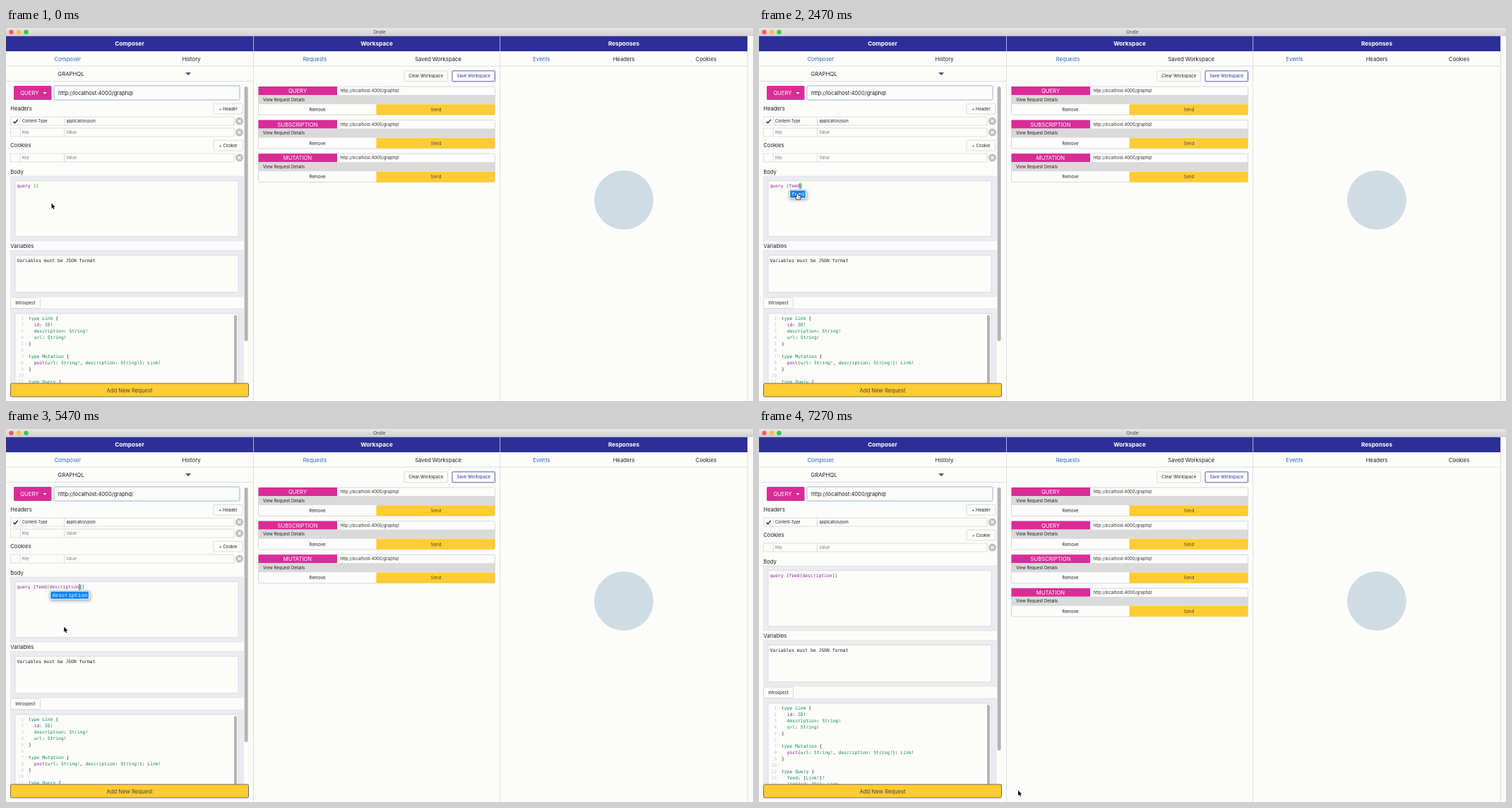
An HTML page with a canvas for the animation above (7.31 s loop, 1058 by 529 pixels).

```html
<!DOCTYPE html>
<html lang="en">
<head>
<meta charset="utf-8">
<title>Ondle</title>
<style>
html, body { margin: 0; width: 100%; height: 100%; overflow: hidden; background: #fcfdfb; }
canvas { display: block; width: 1058px; height: 529px; }
</style>
</head>
<body>
<canvas id="stage"></canvas>
<script>
const W = 1058, H = 529, LOOP = 7310;
const SANS = 'Inter, "Noto Sans", sans-serif';
const MONO = '"DejaVu Sans Mono", monospace';
const HINT = '"Liberation Mono", monospace';
const CH = 3.83;
const C = {
  page: '#fcfdfb', navy: '#2e2e98', pink: '#da2c96', yellow: '#ffcc33', line: '#d6d6d6',
  ink: '#1f1f1f', blue: '#2d64c0', panel: '#ebecf0', purple: '#8a1a9c', green: '#078654',
  match: '#0aa528', hint: '#0a82f5'
};
const URL_TEXT = 'http://localhost:4000/graphql';

const canvas = document.getElementById('stage');
const ctx = canvas.getContext('2d');
const dpr = window.devicePixelRatio || 1;
canvas.width = W * dpr;
canvas.height = H * dpr;

function fill(x, y, w, h, color) {
  ctx.fillStyle = color;
  ctx.fillRect(x, y, w, h);
}

function box(x, y, w, h, bg, border, radius = 0) {
  ctx.beginPath();
  ctx.roundRect(x, y, w, h, radius);
  if (bg) { ctx.fillStyle = bg; ctx.fill(); }
  if (border) { ctx.strokeStyle = border; ctx.lineWidth = 0.8; ctx.stroke(); }
}

function disc(x, y, r, color) {
  ctx.fillStyle = color;
  ctx.beginPath();
  ctx.arc(x, y, r, 0, Math.PI * 2);
  ctx.fill();
}

function shape(points, color, border, width = 1) {
  ctx.beginPath();
  for (let i = 0; i < points.length; i += 2) ctx.lineTo(points[i], points[i + 1]);
  ctx.closePath();
  if (border) { ctx.strokeStyle = border; ctx.lineWidth = width; ctx.stroke(); }
  ctx.fillStyle = color;
  ctx.fill();
}

// y is the middle of the capital letters
function text(s, x, y, size = 7.7, color = C.ink, align = 'left', font = SANS, weight = 400) {
  ctx.font = `${weight} ${size}px ${font}`;
  ctx.textAlign = align;
  ctx.fillStyle = color;
  ctx.fillText(s, x, y + size * 0.36);
}

const mid = (s, x, y, size, color, weight) => text(s, x, y, size, color, 'center', SANS, weight);
const code = (s, x, y, color = C.ink, align) => text(s, x, y, 6.36, color, align, MONO);

function button(s, x, y, w, h, color = C.ink, border = '#d2d2cc') {
  box(x, y, w, h, C.page, border, 1);
  mid(s, x + w / 2, y + h / 2, 6, color);
}

function drawFrame() {
  fill(0, 0, W, H, C.page);
  const bar = ctx.createLinearGradient(0, 0, 0, 11.5);
  bar.addColorStop(0, '#e8e7e8');
  bar.addColorStop(1, '#d1d0d1');
  fill(0, 0, W, 11.5, bar);
  ['#fc5b57', '#fdbc40', '#34c84a'].forEach((c, i) => disc(7.5 + 10.5 * i, 5.7, 3.2, c));
  mid('Ondle', 529, 6, 6.2, '#444');

  fill(0, 11.5, 1050, 21.5, C.navy);
  mid('Composer', 175, 22, 8.2, '#fff', 700);
  mid('Workspace', 525, 22, 8.2, '#fff', 700);
  mid('Responses', 875, 22, 8.2, '#fff', 700);
  fill(0, 53.6, 1050, 0.8, C.line);
  for (const x of [350, 699.3, 1050]) fill(x, 11.5, 0.8, H, C.line);

  const tabs = [['Composer', 87.3, 1], ['History', 262.5], ['Requests', 437.5, 1],
    ['Saved Workspace', 612, 0], ['Events', 758.5, 1], ['Headers', 875], ['Cookies', 991.5]];
  for (const [s, x, on] of tabs) mid(s, x, 43.8, 7.7, on ? C.blue : C.ink);

  mid('GRAPHQL', 92, 65, 7.8);
  shape([254.3, 63, 262, 63, 258.15, 67.3], '#555');
  fill(0, 75, 350, 0.8, C.line);
  disc(875, 244, 42, '#cfdde3');
}

function fieldRow(y, key, value) {
  box(6.5, y, 316.5, 12, C.page, C.line);
  fill(19.8, y, 0.8, 12, C.line);
  fill(82, y, 0.8, 12, C.line);
  const color = key ? C.ink : '#777';
  text(key || 'Key', 23, y + 6, 5.5, color);
  text(value || 'Value', 85.5, y + 6, 5.5, color);
  if (key) {
    ctx.strokeStyle = '#111';
    ctx.lineWidth = 1.3;
    ctx.beginPath();
    ctx.moveTo(10.4, y + 6.6);
    ctx.lineTo(12.6, y + 8.8);
    ctx.lineTo(16.6, y + 3.8);
    ctx.stroke();
  }
  disc(330.5, y + 6, 5.5, '#bfbfbb');
  ctx.strokeStyle = '#fff';
  ctx.lineWidth = 1.1;
  ctx.beginPath();
  for (const d of [2, -2]) {
    ctx.moveTo(330.5 - d, y + 4);
    ctx.lineTo(330.5 + d, y + 8);
  }
  ctx.stroke();
}

function editor(y, h) {
  fill(6.5, y, 329.5, h, C.panel);
  box(6.5, y, 329.5, h, null, '#dfe0e3');
  box(13, y + 6.7, 316, h - 13, C.page, '#d3d5d8');
}

const SCHEMA = ['type Link {', '  id: ID!', '  description: String!', '  url: String!', '}', '',
  'type Mutation {', '  post(url: String!, description: String!): Link!', '}', '',
  'type Query {', '  feed: [Link!]!', '  link(id: ID!): Link'];

function schemaLine(s, x, y) {
  for (const m of s.matchAll(/\w+|[^\w\s]/g)) {
    const color = /^(id|post)$/.test(m[0]) ? C.purple : /\w|!/.test(m[0]) ? C.green : C.ink;
    code(m[0], x + m.index * CH, y, color);
  }
}

// Text after "query ", index of the highlighted bracket pair, hints, hint column
const STATES = [
  { at: 0, body: '{}', pair: [0, 1] },
  { at: 1000, body: '{f}', pair: [0, 2], hints: ['feed'], col: 1 },
  { at: 2330, body: '{feed}', pair: [0, 5], hints: ['feed'], col: 1 },
  { at: 3000, body: '{feed{}}', pair: [5, 6], hints: ['id', 'description', 'url', '__typename'], col: 6 },
  { at: 5030, body: '{feed{description}}', pair: [5, 17], hints: ['description'], col: 6 },
  { at: 6540, body: '{feed{description}}', added: true }
];

const column = i => 15.5 + (6 + i) * CH;

function drawBody(st, y) {
  code('query', 15.5, y, C.purple);
  const pair = st.pair || [];
  if (st.hints) {
    const x = column(pair[1]);
    fill(x, y - 4.5, CH, 9, '#d2dfd2');
    fill(x, y - 4.5, 0.7, 9, '#333');
  }
  [...st.body].forEach((c, i) => {
    const color = pair.includes(i) ? C.match : /\w/.test(c) ? C.purple : '#53405c';
    code(c, column(i), y, color);
  });
}

function popupBox(st) {
  if (!st.hints) return null;
  const chars = Math.max(...st.hints.map(s => s.length));
  return { x: column(st.col), y: 229, w: chars * 4.58 + 7, h: 2 + 11.1 * st.hints.length };
}

function drawPopup(st) {
  const p = popupBox(st);
  if (!p) return;
  ctx.save();
  ctx.shadowColor = 'rgba(0,0,0,.3)';
  ctx.shadowBlur = 4 * dpr;
  ctx.shadowOffsetX = dpr;
  ctx.shadowOffsetY = 2 * dpr;
  box(p.x, p.y, p.w, p.h, '#fff', null, 2);
  ctx.restore();
  box(p.x, p.y, p.w, p.h, null, '#bdbdbd', 2);
  box(p.x + 1.8, 230.4, p.w - 3.6, 10.4, C.hint, null, 1);
  st.hints.forEach((s, i) =>
    text(s, p.x + 3.8, 235.4 + 11.1 * i, 7.63, i ? '#111' : '#fff', 'left', HINT));
}

function drawComposer(st) {
  const up = st.added ? -16 : 0;
  ctx.save();
  ctx.beginPath();
  ctx.rect(0, 76, 349, 427.5);
  ctx.clip();

  box(11, 82, 53.5, 20, C.pink, null, 1.5);
  mid('QUERY', 33.3, 92.2, 7.7, '#fff');
  shape([52.4, 91, 57.6, 91, 55, 93.7], '#fff');
  box(68, 82, 263, 20, C.page, '#74a5cd', 1.5);
  text(URL_TEXT, 74, 92, 7.6);

  text('Headers', 6.3, 114, 7.6);
  button('+ Header', 294, 107.3, 41, 14.8);
  fieldRow(126, 'Content-Type', 'application/json');
  if (!st.added) fieldRow(142, '', '');

  ctx.translate(0, up);
  text('Cookies', 6.3, 166, 7.6);
  button('+ Cookie', 294, 159.2, 41, 14.8);
  fieldRow(178, '', '');

  text('Body', 6.3, 203.8, 7.6);
  editor(210, 92);
  drawBody(st, 224.2);

  text('Variables', 6.3, 309.7, 7.6);
  editor(315.6, 65.4);
  code('Variables must be JSON format', 15.5, 329.6);

  editor(398.2, 220);
  button('Introspect', 6.5, 382.2, 42, 15.4);
  SCHEMA.forEach((s, i) => {
    const y = 412.2 + 9 * i;
    code(i + 1, 25, y, '#c6c9c6', 'right');
    schemaLine(s, 32, y);
  });
  box(323, 407, 4, 190, '#b4b4b4', null, 2);
  drawPopup(st);
  ctx.restore();

  box(337.6, 83, 5, st.added ? 373 : 361, '#b3b3b3', null, 2.5);
  box(6.5, 504, 337, 19, C.yellow, '#4c4c4c', 1.8);
  mid('Add New Request', 175, 514.2, 7.7, '#4d4220');
}

function card(kind, y) {
  box(357.5, y, 335, 40.3, C.page, '#cfcfcf', 1.5);
  fill(357.5, y, 111.5, 12, C.pink);
  mid(kind, 413, y + 6.2, 7.7, '#fff');
  text(URL_TEXT, 473.4, y + 5.8, 5.95, '#333');
  fill(357.5, y + 12, 335, 13, '#dadada');
  text('View Request Details', 364, y + 18.4, 5.95);
  mid('Remove', 441, y + 32.8, 6);
  box(524.5, y + 25.2, 168, 15, C.yellow, null, [0, 0, 1.5, 0]);
  mid('Send', 609, y + 32.8, 6.1, '#4d4220');
}

function drawWorkspace(st) {
  button('Clear Workspace', 564, 60.8, 61.5, 15);
  button('Save Workspace', 632, 60.8, 60.5, 15, C.navy, C.navy);
  const kinds = ['QUERY', 'SUBSCRIPTION', 'MUTATION'];
  if (st.added) kinds.unshift('QUERY');
  kinds.forEach((kind, i) => card(kind, 83 + 47.6 * i));
}

// Pointer tip: time, x, y
const PATH = [[0, 64.5, 248.5], [500, 64.5, 248.5], [1150, 85.5, 260.5], [1500, 85.5, 260.5],
  [2100, 54.5, 235], [3500, 54.5, 234.5], [4400, 71, 245.5], [5300, 71, 245.5],
  [6050, 155.5, 509.5], [6600, 155.5, 509.5], [7150, 367, 512.5], [LOOP, 367, 512.5]];

function pointerAt(t) {
  const i = PATH.findIndex(p => p[0] > t);
  const [t0, x0, y0] = PATH[i - 1], [t1, x1, y1] = PATH[i];
  const u = (t - t0) / (t1 - t0), e = u * u * (3 - 2 * u);
  return { x: x0 + (x1 - x0) * e, y: y0 + (y1 - y0) * e };
}

const inside = (p, x, y, w, h) => p.x >= x && p.x <= x + w && p.y >= y && p.y <= y + h;

function drawPointer(p, st) {
  const menu = popupBox(st);
  const hand = inside(p, 6.5, 504, 337, 19) || (menu && inside(p, menu.x, menu.y, menu.w, menu.h));
  ctx.save();
  ctx.translate(p.x, p.y);
  ctx.lineJoin = 'round';
  if (hand) {
    shape([-0.8, 0.4, 0, 0, 0.8, 0.5, 1, 2.8, 2.4, 2.8, 3.6, 3.3, 4.3, 4, 4.1, 6,
      3.3, 8.3, -0.5, 8.3, -2.8, 5.2, -2.3, 4.4, -0.8, 5.4], '#fff', '#111', 1.5);
    ctx.strokeStyle = '#555';
    ctx.lineWidth = 0.5;
    ctx.beginPath();
    for (const x of [0.7, 1.9, 3]) { ctx.moveTo(x, 5.3); ctx.lineTo(x, 7); }
    ctx.stroke();
  } else {
    shape([0, 0, 0, 7.6, 1.7, 6, 2.9, 8.8, 4.1, 8.3, 3, 5.6, 5.3, 5.5], '#111', '#fff', 1.2);
  }
  ctx.restore();
}

function draw(t) {
  const st = STATES.findLast(s => s.at <= t);
  ctx.setTransform(dpr, 0, 0, dpr, 0, 0);
  drawFrame();
  drawComposer(st);
  drawWorkspace(st);
  drawPointer(pointerAt(t), st);
}

const start = performance.now();
function tick() {
  draw((performance.now() - start) % LOOP);
  requestAnimationFrame(tick);
}
tick();
</script>
</body>
</html>
```
